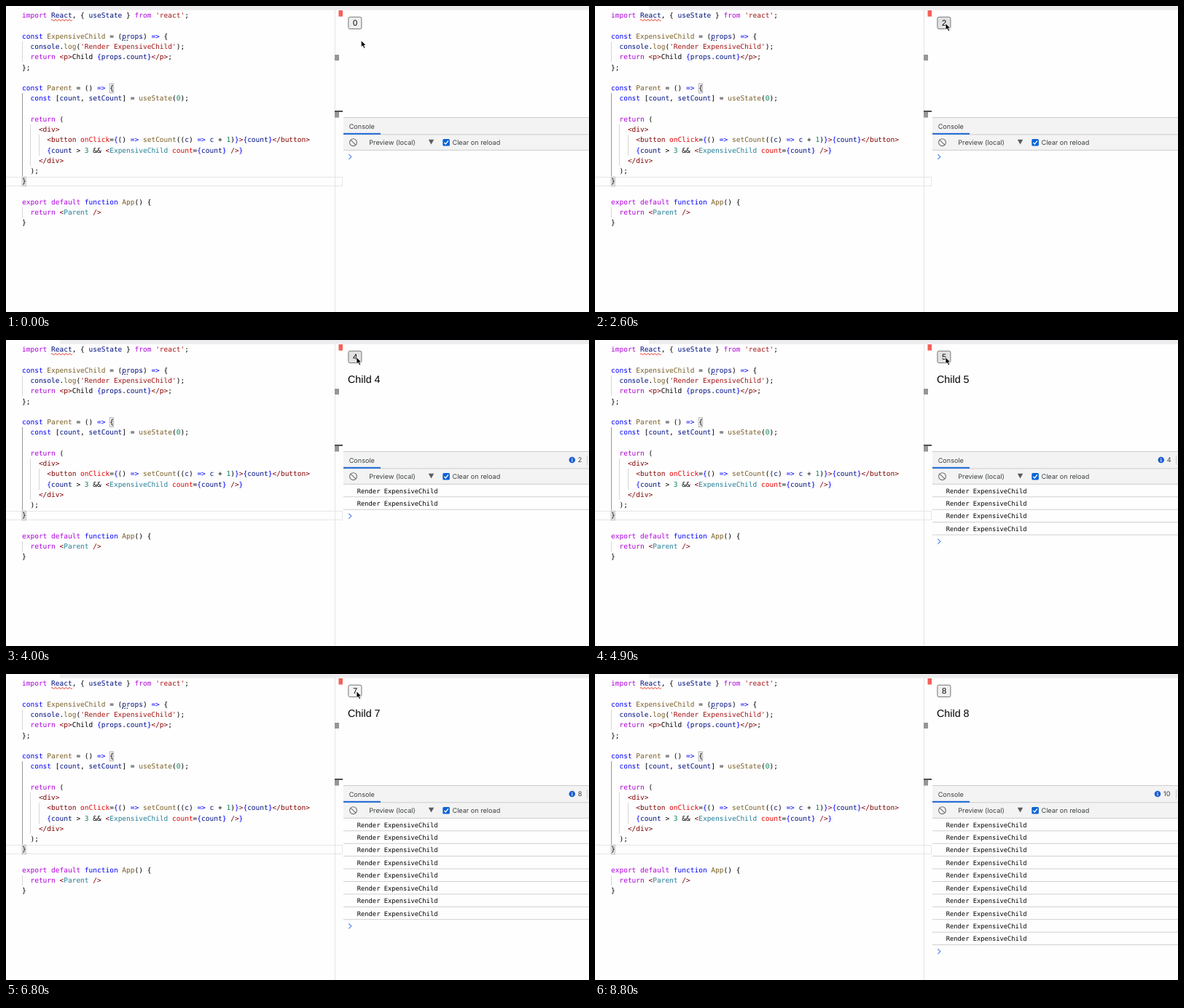
An HTML page for the animation above (8900 ms loop, 800 by 421 pixels).

```html
<!DOCTYPE html>
<html lang="en">
<head>
<meta charset="utf-8">
<style>
  html, body { margin: 0; width: 100%; height: 100%; overflow: hidden; background: #fefefe; }
  svg { display: block; width: 100%; height: 100%; }
  text { white-space: pre; text-rendering: geometricPrecision; }
  .mono { font-family: "DejaVu Sans Mono", monospace; font-size: 9.5px; fill: #000; }
  .log { font-size: 8.75px; }
  .ui { font-family: Inter, sans-serif; font-size: 9.1px; fill: #3c4043; }
  .page { font-family: "Liberation Sans", Arial, sans-serif; font-size: 14.3px; fill: #000; }
  .k { fill: #af00db } .b { fill: #0000ff } .f { fill: #795e26 } .v { fill: #001080 }
  .s { fill: #a31515 } .t { fill: #800000 } .c { fill: #267f99 } .a { fill: #e50000 } .n { fill: #098658 }
</style>
</head>
<body>
<svg viewBox="0 0 800 421">
  <rect width="800" height="421" fill="#fefefe"/>
  <rect x="74" width="726" height="5.5" fill="#ececee"/>

  <!-- editor -->
  <g fill="none" stroke="#d6d6d6">
    <path d="M22.5 49V77M22.5 277V291M33.5 163V220M45.5 177V206"/>
    <path d="M22.5 120V234" stroke="#9a9a9a"/>
    <path d="M0 235.5H462M0 247.5H462M461.5 235V248" stroke="#e6e6e6"/>
    <path d="M451.5 5V421" stroke="#e4e4e4"/>
    <g fill="#eeeeee" stroke="#b9b9b9">
      <rect x="142.2" y="106.8" width="5.4" height="12.8"/>
      <rect x="22.2" y="235.2" width="5" height="12.6"/>
    </g>
  </g>
  <g id="code" class="mono"></g>
  <path d="M62 19.5q1.2 -2 2.4 0t2.4 0t2.4 0t2.4 0t2.4 0t2.4 0t2.4 0t2.4 0t2.4 0t2.4 0t2.4 0t2.4 0" fill="none" stroke="#e51400" stroke-width=".9"/>
  <path d="M159 47.3h1.6m1.7 0h1.6m1.7 0h1.6" stroke="#40507a" stroke-width="1.5"/>
  <rect x="456.5" y="6" width="5.5" height="8.5" fill="#f4605a"/>
  <path d="M451 67h6v8h-6zM451 146h6v7.5h-6z" fill="#969696"/>
  <rect x="451" y="144" width="11" height="1.7" fill="#303030"/>

  <!-- preview -->
  <rect id="button" x="469.9" y="15.2" width="18" height="16.3" rx="2" stroke="#767676"/>
  <text id="count" class="page" x="479" y="27.2" text-anchor="middle" style="font-size:11.2px"></text>
  <text id="child" class="page" x="469" y="59.2"></text>

  <!-- console -->
  <rect x="463" y="153" width="337" height="45.5" fill="#f3f3f3"/>
  <path d="M463 153.5H800M463 176.8H800M463 198.3H800" stroke="#cccccc"/>
  <rect x="463" y="174.8" width="51" height="2" fill="#1a66d6"/>
  <text class="ui" x="470.7" y="169.2">Console</text>
  <text class="ui" x="498.3" y="190.9">Preview (local)</text>
  <text class="ui" x="612.5" y="190.9">Clear on reload</text>
  <g fill="none" stroke="#6e6e6e" stroke-width="1.1">
    <circle cx="476.5" cy="187.7" r="4.9"/><path d="M473.1 184.3l6.8 6.8"/>
  </g>
  <path d="M579.8 183.8h7.4l-3.7 6.6z" fill="#5a5d61"/>
  <rect x="599.3" y="183" width="9.6" height="9.6" rx="1.6" fill="#0b63d8"/>
  <path d="M601.4 188l1.9 2l3.6 -4.6" fill="none" stroke="#fff" stroke-width="1.4"/>
  <g id="logs"></g>
  <path id="prompt" d="M470.3 -3.5l3.6 3.4l-3.6 3.4" fill="none" stroke="#5b8def" stroke-width="1.2"/>
  <g id="badge">
    <circle r="4.3" fill="#1a5fd0"/>
    <path d="M0 -2.4v1.1M0 -.6v3" stroke="#fff" stroke-width="1.1"/>
    <text id="total" class="ui" x="8" y="3.3"></text>
  </g>
  <path id="divider" d="M797.5 159V172" stroke="#cccccc"/>

  <path id="cursor" d="M0 0V9.4L2.2 7.4L3.8 11L5.6 10.2L4 6.8H6.8Z" fill="#000" stroke="#fff" stroke-width=".8"/>
</svg>
<script>
const $ = id => document.getElementById(id);
const LOOP = 8900, ROW = 17.42, CHAR = 5.72, LINE = 14.25;
const CLICKS = [1200, 2100, 2900, 3700, 4500, 5300, 6100, 6900];
const PRESS = 100, CURSOR_GONE = 8300;

// Each «x text» run is coloured by class x.
const SOURCE = `«k import» «v React», { «v useState» } «k from» «s 'react'»;

«b const» «f ExpensiveChild» = («v props») «b =>» {
  «v console».«f log»(«s 'Render ExpensiveChild'»);
  «k return» «t <p>»Child «b {»«v props».«v count»«b }»«t </p>»;
};

«b const» «f Parent» = () «b =>» {
  «b const» [«v count», «v setCount»] = «f useState»(«n 0»);

  «k return» (
    «t <div>»
      «t <button» «a onClick»=«b {»() «b =>» «f setCount»((«v c») «b =>» «v c» + «n 1»)«b }»«t >»«b {»«v count»«b }»«t </button>»
      «b {»«v count» > «n 3» && «t <»«c ExpensiveChild» «a count»=«b {»«v count»«b }» «t />»«b }»
    «t </div>»
  );
}

«k export» «k default» «b function» «f App»() {
  «k return» «t <»«c Parent» «t />»
}`;

const escapeHtml = s => s.replace(/&/g, '&amp;').replace(/</g, '&lt;').replace(/>/g, '&gt;');

$('code').innerHTML = SOURCE.split('\n').map((line, i) => {
  const body = line.trimStart();
  const x = 22 + (line.length - body.length) * CHAR;
  const runs = escapeHtml(body).replace(/«(\w) (.*?)»/g, '<tspan class="$1">$2</tspan>');
  return `<text x="${x}" y="${16.4 + i * LINE}">${runs}</text>`;
}).join('');

$('logs').innerHTML = Array.from({ length: 10 }, (_, i) => `<g>
  <text class="mono log" x="481.8" y="${210.6 + i * ROW}">Render ExpensiveChild</text>
  <path d="M463 ${215.8 + i * ROW}H800" stroke="#cfcfcf"/></g>`).join('');

const show = (node, visible) => node.setAttribute('visibility', visible ? 'visible' : 'hidden');
const move = (id, x, y) => $(id).setAttribute('transform', `translate(${x} ${y})`);

function draw(t) {
  const count = CLICKS.filter(click => t >= click).length;
  const total = Math.max(0, count - 3) * 2;

  const p = Math.min(1, Math.max(0, (t - 100) / 800));
  const ease = p * p * (3 - 2 * p);
  const y = 47.3 - 23.6 * ease;
  move('cursor', 487.3 - 6.3 * ease, y);
  show($('cursor'), t < CURSOR_GONE);

  const pressed = CLICKS.some(click => t >= click - PRESS && t < click);
  const hovered = y < 31 && t < CURSOR_GONE;
  $('button').setAttribute('fill', pressed ? '#f5f5f5' : hovered ? '#e2e2e2' : '#efefef');
  $('count').textContent = count;
  $('child').textContent = count > 3 ? 'Child ' + count : '';

  [...$('logs').children].forEach((row, i) => show(row, i < total));
  move('prompt', 0, 207.6 + total * ROW);
  show($('badge'), total > 0);
  show($('divider'), total > 0);
  move('badge', total > 9 ? 772 : 776.8, 165);
  $('total').textContent = total || '';
}

const start = performance.now();
function tick() {
  draw((performance.now() - start) % LOOP);
  requestAnimationFrame(tick);
}
tick();
</script>
</body>
</html>
```
